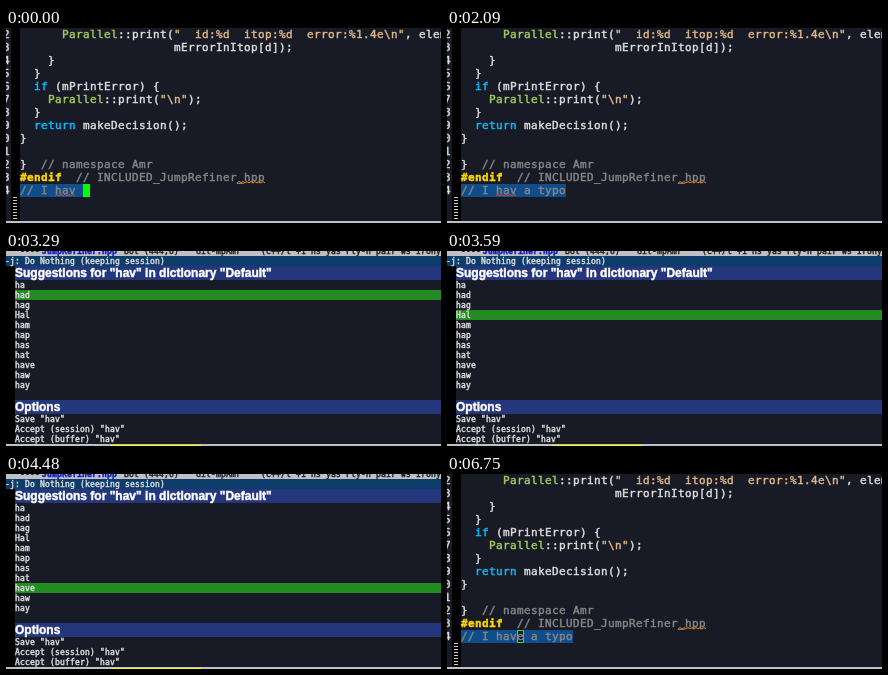
These frames come from a looping animation (435 px wide and 195 px high, 6.85 s). An HTML page with a canvas:

```html
<!DOCTYPE html>
<html lang="en">
<head>
<meta charset="utf-8">
<title>Spell correction in an editor</title>
<style>
  html, body { margin: 0; width: 100%; height: 100%; overflow: hidden; background: #181a26; }
  canvas { display: block; }
</style>
</head>
<body>
<canvas id="stage" width="435" height="195"></canvas>
<script>
const ctx = document.getElementById('stage').getContext('2d', { alpha: false });
const W = 435, H = 195, LOOP = 6850;
const COLOR = {
  back: '#181a26', text: '#dcdcdc', comment: '#858585', space: '#a2cd5a',
  string: '#deb887', keyword: '#00bfff', directive: '#ffd700', region: '#104e8b',
  cursor: '#00ff00', typo: '#d0503c', doubt: '#e8861c', bar: '#bfbfc6',
  prompt: '#0b3c6a', header: '#24367c', pick: '#228b22'
};
const MONO = '"DejaVu Sans Mono", monospace';
const CODE = { font: `11px ${MONO}`, bold: `bold 11px ${MONO}`, cell: 7, row: 13, left: 14, base: 10 };
const MENU = { font: `8px ${MONO}`, bold: `bold 8px ${MONO}`, cell: 5, row: 10, left: 9, base: 8 };
const FIRST_LINE = 432;

// Each code line: starting column, then [text, color] pieces.
const LINES = [
  [6, ['Parallel', 'space'], ['::print(', 'text'],
      ['"  id:%d  itop:%d  error:%1.4e\\n"', 'string'], [', elem', 'text']],
  [22, ['mErrorInItop[d]);', 'text']],
  [4, ['}', 'text']],
  [2, ['}', 'text']],
  [2, ['if', 'keyword'], [' (mPrintError) {', 'text']],
  [4, ['Parallel', 'space'], ['::print(', 'text'], ['"\\n"', 'string'], [');', 'text']],
  [2, ['}', 'text']],
  [2, ['return', 'keyword'], [' makeDecision();', 'text']],
  [0, ['}', 'text']],
  [0],
  [0, ['}', 'text'], ['  // namespace Amr', 'comment']],
  [0, ['#endif', 'directive'], ['  // INCLUDED_JumpRefiner_hpp', 'comment']]
];
const WORDS = ['ha', 'had', 'hag', 'Hal', 'ham', 'hap', 'has', 'hat', 'have', 'haw', 'hay'];
const OPTIONS = ['Save "hav"', 'Accept (session) "hav"', 'Accept (buffer) "hav"'];

const TYPO = '// I hav a typo', FIXED = '// I have a typo';
// [start time, text, cursor column, cursor style]
const EDITS = [
  [0, TYPO.slice(0, 9), 9, 'block'],
  [150, TYPO.slice(0, 10), 10, 'block'],
  [300, TYPO.slice(0, 12), 12, 'block'],
  [450, TYPO.slice(0, 13), 13, 'block'],
  [600, TYPO.slice(0, 14), 14, 'block'],
  [750, TYPO, 15, 'block'],
  [900, TYPO, 11, 'block'],
  [1050, TYPO, 9, 'block'],
  [1490, TYPO, 8, 'block'],
  [1640, TYPO, 7, 'block'],
  [2090, TYPO, 7, 'none'],
  [4780, FIXED, 8, 'block'],
  [5230, FIXED, 8, 'none'],
  [5980, FIXED, 8, 'block'],
  [6270, FIXED, 8, 'none'],
  [6750, FIXED, 8, 'hollow']
];
const MENU_START = 2690, MENU_END = 4780;
const PICK_TIMES = [2690, 3290, 3440, 3590, 3880, 4030, 4180, 4330, 4480];

function box(x, y, w, h, color) {
  ctx.fillStyle = color;
  ctx.fillRect(x, y, w, h);
}

// A thin outline in the same color gives the text its heavier weight.
function write(text, x, y, color) {
  ctx.fillStyle = ctx.strokeStyle = color;
  ctx.lineWidth = 0.45;
  ctx.fillText(text, x, y);
  ctx.strokeText(text, x, y);
}

// Draws text on a fixed character grid; returns the x after the last cell.
function cells(text, x, top, grid, color, bold) {
  ctx.font = bold ? grid.bold : grid.font;
  for (const char of text) {
    if (char !== ' ') write(char, x, top + grid.base, color);
    x += grid.cell;
  }
  return x;
}

function wave(col, row, count, color) {
  const x = CODE.left + col * CODE.cell, y = (row + 1) * CODE.row - 1.5;
  ctx.beginPath();
  for (let dx = 0; dx <= count * CODE.cell; dx += 2) {
    ctx.lineTo(x + dx, y + (dx % 4 ? -1 : 0.5));
  }
  ctx.strokeStyle = color;
  ctx.lineWidth = 1;
  ctx.stroke();
}

function drawCursor(text, col, style, top) {
  if (style === 'none') return;
  const x = CODE.left + col * CODE.cell, solid = style === 'block';
  box(x, top, CODE.cell, CODE.row, COLOR.cursor);
  if (!solid) box(x + 1, top + 1, CODE.cell - 2, CODE.row - 2, COLOR.back);
  cells(text[col] || '', x, top, CODE, solid ? '#102818' : COLOR.comment);
}

function drawEditor(time) {
  const [, text, col, style] = EDITS.findLast(edit => edit[0] <= time);
  const last = LINES.length, top = last * CODE.row;
  for (let row = 0; row <= last; row++) {
    cells(String((FIRST_LINE + row) % 10), -3, row * CODE.row, CODE, COLOR.text);
  }
  box(5, 0, 9, H, '#000');
  for (let y = top + CODE.row; y < 192; y += 3) box(7, y, 4, 1, '#cccccc');

  LINES.forEach(([indent, ...pieces], row) => {
    let x = CODE.left + indent * CODE.cell;
    for (const [part, color] of pieces) {
      x = cells(part, x, row * CODE.row, CODE, COLOR[color], color === 'directive');
    }
  });
  wave(31, 11, 4, COLOR.doubt);

  box(CODE.left, top, text.length * CODE.cell, CODE.row, COLOR.region);
  cells(text, CODE.left, top, CODE, COLOR.comment);
  if (text !== FIXED) wave(5, last, 3, COLOR.typo);
  drawCursor(text, col, style, top);
  box(0, 193, W, 2, COLOR.bar);
}

function heading(text, top) {
  box(MENU.left, top, W, 14, COLOR.header);
  ctx.font = 'bold 12px "Liberation Sans", Arial, sans-serif';
  write(text, MENU.left, top + 11, '#fff');
}

function drawMenu(time) {
  box(0, 0, MENU.left, H, '#000');
  box(0, 0, W, 5, COLOR.bar);
  cells('----', 14, -5, MENU, '#222');
  cells('JumpRefiner.hpp', 36, -5, MENU, '#1020c0', true);
  cells('Bot (444,6)', 118, -5, MENU, '#222');
  cells('Git-mpAmr', 190, -5, MENU, '#222');
  cells('(C++/l +1 hs yas Fly-h pair ws Irony', 255, -5, MENU, '#222');
  box(0, 5, W, 10, COLOR.prompt);
  cells('-j: Do Nothing (keeping session)', -1, 5, MENU, COLOR.text);

  heading('Suggestions for "hav" in dictionary "Default"', 15);
  const picked = PICK_TIMES.findLastIndex(start => start <= time);
  box(MENU.left, 29 + picked * MENU.row, W, MENU.row, COLOR.pick);
  WORDS.forEach((word, i) => cells(word, MENU.left, 29 + i * MENU.row, MENU, COLOR.text));

  heading('Options', 149);
  OPTIONS.forEach((option, i) => cells(option, MENU.left, 163 + i * MENU.row, MENU, COLOR.text));
  box(0, 193, W, 2, COLOR.bar);
  box(105, 194, 90, 1, '#ffff00');
}

function frame() {
  const time = performance.now() % LOOP;
  box(0, 0, W, H, COLOR.back);
  if (time >= MENU_START && time < MENU_END) drawMenu(time);
  else drawEditor(time);
  requestAnimationFrame(frame);
}
frame();
</script>
</body>
</html>
```
